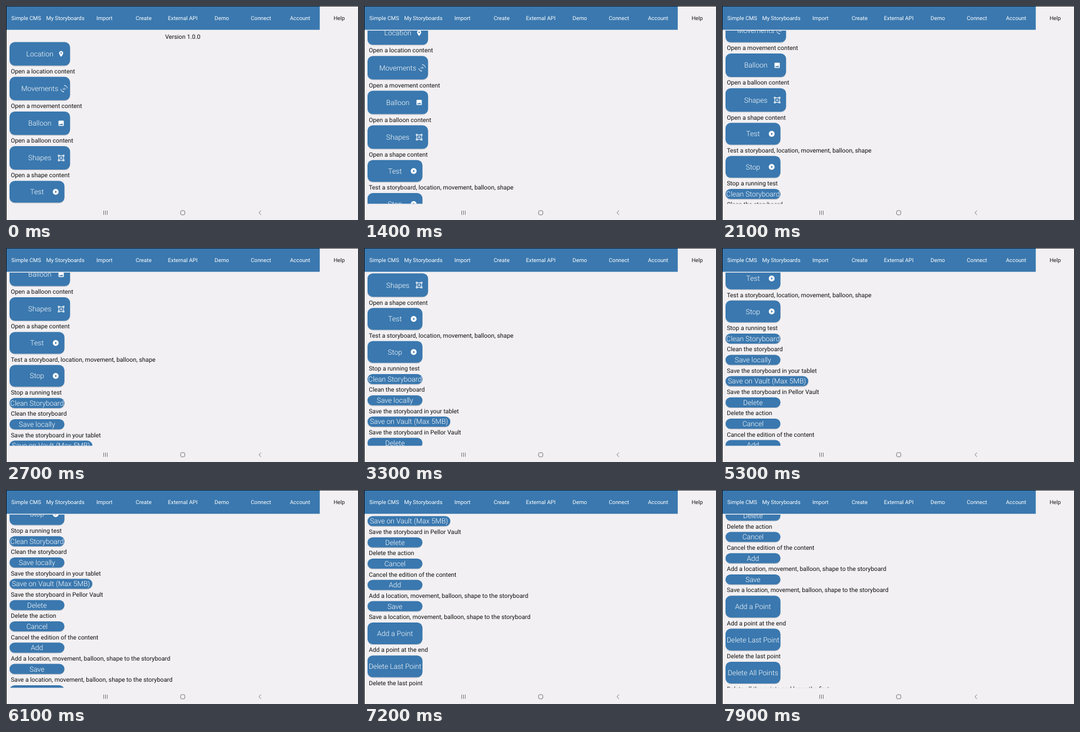
Write an HTML page that moves like this. It is 600 px wide and 365 px high and loops after 8 s.

```html
<!DOCTYPE html>
<html lang="en">
<head>
<meta charset="utf-8">
<title>Help page scroll</title>
<style>
  html, body { margin: 0; width: 100%; height: 100%; overflow: hidden; background: #f2f0f2; }
  svg { display: block; width: 600px; height: 365px; }
  text { font-family: Roboto, "Noto Sans", sans-serif; text-rendering: geometricPrecision; }
  .tab { font-size: 9.35px; fill: #fff; text-anchor: middle; }
  .tab.active { fill: #1c1c1c; }
  .caption { font-size: 10.35px; fill: #111; }
  .label { font-size: 12.15px; font-weight: 300; fill: #fff; text-anchor: middle; }
  .nav { fill: none; stroke: #77757a; stroke-width: 1; }
</style>
</head>
<body>
<svg viewBox="0 0 600 365" xmlns="http://www.w3.org/2000/svg">
  <defs>
    <clipPath id="view"><rect x="1" y="42" width="599" height="295.3"/></clipPath>
  </defs>
  <rect width="600" height="365" fill="#f2f0f2"/>
  <g clip-path="url(#view)"><g id="page"></g></g>
  <g id="header">
    <rect x="1" width="533.8" height="40.6" fill="#3a78af"/>
  </g>
  <path d="M0 0H600V.7H1V365H0Z" fill="#0b0b0d"/>
  <g class="nav">
    <path d="M166.5 349v7.2M169.5 349v7.2M172.5 349v7.2"/>
    <rect x="297.6" y="349" width="7.2" height="7.2" rx="2.2"/>
    <path d="M434.7 349l-3.7 3.6 3.7 3.6"/>
  </g>
</svg>
<script>
const LOOP = 8000, STEP = 100;
const BLUE = '#3a78af';
const NARROW = 93.6, WIDE = 103.2;
const TALL = 39.95, MID = 37.1, SLIM = 17.1, GAP = 19.2;

const tabs = ['Simple CMS', 'My Storyboards', 'Import', 'Create', 'External API',
  'Demo', 'Connect', 'Account', 'Help'];

// Icons live on a 24 unit grid.
const icons = {
  pin: 'M12 2C8.13 2 5 5.13 5 9c0 5.25 7 13 7 13s7-7.75 7-13c0-3.87-3.13-7-7-7zm0 9.5a2.5 2.5 0 1 1 0-5 2.5 2.5 0 0 1 0 5z',
  rotate: 'M7.52 21.48C4.25 19.94 1.91 16.76 1.55 13H.05C.56 19.16 5.71 24 12 24l.66-.03-3.81-3.81zM16.48 2.52c3.27 1.55 5.61 4.72 5.97 8.48h1.5C23.44 4.84 18.29 0 12 0l-.66.03 3.81 3.81z',
  image: 'M21 19V5a2 2 0 0 0-2-2H5a2 2 0 0 0-2 2v14a2 2 0 0 0 2 2h14a2 2 0 0 0 2-2zM8.5 13.5l2.5 3 3.5-4.5 4.5 6H5z',
  shapes: 'M1 1h6v2h10V1h6v6h-2v10h2v6h-6v-2H7v2H1v-6h2V7H1zM3 3v2h2V3zM19 3v2h2V3zM3 19v2h2v-2zM19 19v2h2v-2zM7 5v2H5v10h2v2h10v-2h2V7h-2V5zM11.3 7h1.4l3.4 9h-1.6l-.8-2h-3.4l-.8 2H7.9zM12 8.9l-1.3 3.8h2.6z',
  play: 'M12 2a10 10 0 1 0 0 20 10 10 0 0 0 0-20zM10 7.5l6 4.5-6 4.5z'
};

// label, caption, height, width, icon, icon centre x
const rows = [
  ['Location', 'Open a location content', TALL, WIDE, 'pin', 94],
  ['Movements', 'Open a movement content', TALL, WIDE, 'rotate', 99],
  ['Balloon', 'Open a balloon content', TALL, WIDE, 'image', 94],
  ['Shapes', 'Open a shape content', TALL, WIDE, 'shapes', 94],
  ['Test', 'Test a storyboard, location, movement, balloon, shape', MID, NARROW, 'play', 84.7],
  ['Stop', 'Stop a running test', MID, NARROW, 'play', 84.7],
  ['Clean Storyboard', 'Clean the storyboard', SLIM],
  ['Save locally', 'Save the storyboard in your tablet', SLIM],
  ['Save on Vault (Max 5MB)', 'Save the storyboard in Pellor Vault', SLIM, 141.2],
  ['Delete', 'Delete the action', SLIM],
  ['Cancel', 'Cancel the edition of the content', SLIM],
  ['Add', 'Add a location, movement, balloon, shape to the storyboard', SLIM],
  ['Save', 'Save a location, movement, balloon, shape to the storyboard', SLIM],
  ['Add a Point', 'Add a point at the end', MID],
  ['Delete Last Point', 'Delete the last point', MID],
  ['Delete All Points', 'Delete all the points and leave the first', MID]
];

// time, scroll offset
const keys = [[700, 0], [1400, 35.5], [2700, 155], [3900, 231], [4300, 251],
  [4900, 251], [6100, 332], [7200, 439], [7900, 484.6]];

const page = document.getElementById('page');
const header = document.getElementById('header');

function add(parent, tag, attrs, text) {
  const el = document.createElementNS('http://www.w3.org/2000/svg', tag);
  for (const name in attrs) el.setAttribute(name, attrs[name]);
  if (text) el.textContent = text;
  parent.appendChild(el);
  return el;
}

function addIcon(name, x, y) {
  const g = add(page, 'g', { transform: `translate(${x - 6} ${y - 6}) scale(.5)`, fill: '#fff' });
  add(g, 'path', { d: icons[name], 'fill-rule': 'evenodd' });
  if (name === 'rotate') {
    add(g, 'text', { x: 12, y: 15.2, 'font-size': 9, 'text-anchor': 'middle' }, '3D');
  }
}

function addButton(y, label, h, w, icon, iconX) {
  const rx = Math.min(9, h / 2), mid = y + h / 2;
  add(page, 'rect', { x: 6, y: y + 1.1, width: w, height: h, rx, fill: '#8f9dad', opacity: .6 });
  add(page, 'rect', { x: 6, y, width: w, height: h, rx, fill: BLUE });
  add(page, 'text', { class: 'label', x: 6 + w / 2, y: mid + 4.4 }, label);
  if (icon) addIcon(icon, iconX, mid + .2);
}

function build() {
  tabs.forEach((name, i) => {
    const cls = i === tabs.length - 1 ? 'tab active' : 'tab';
    add(header, 'text', { class: cls, x: 34.4 + i * 66.7, y: 23.9 }, name);
  });
  add(page, 'text', { class: 'caption', x: 301.3, y: 55.8, 'text-anchor': 'middle' }, 'Version 1.0.0');
  let y = 61.6;
  for (const [label, caption, h, w = NARROW, icon, iconX] of rows) {
    addButton(y, label, h, w, icon, iconX);
    add(page, 'text', { class: 'caption', x: 8.2, y: y + h + 13.4 }, caption);
    y += h + GAP;
  }
}

const slope = i => (keys[i + 1][1] - keys[i][1]) / (keys[i + 1][0] - keys[i][0]);

// Harmonic mean keeps the curve from overshooting.
function tangent(i) {
  if (i === 0) return 0;
  if (i === keys.length - 1) return slope(i - 1);
  const a = slope(i - 1), b = slope(i);
  return a * b > 0 ? 2 * a * b / (a + b) : 0;
}

function scrollAt(t) {
  if (t <= keys[0][0]) return 0;
  let i = 0;
  while (i < keys.length - 2 && t > keys[i + 1][0]) i++;
  const [t0, y0] = keys[i], [t1, y1] = keys[i + 1];
  const d = t1 - t0, u = Math.min(1, (t - t0) / d), v = 1 - u;
  return y0 * (1 + 2 * u) * v * v + y1 * u * u * (3 - 2 * u)
    + d * u * v * (tangent(i) * v - tangent(i + 1) * u);
}

function draw(now) {
  const t = Math.floor((now % LOOP) / STEP) * STEP;
  page.setAttribute('transform', `translate(0 ${-scrollAt(t)})`);
}

build();
const start = performance.now();
function tick() {
  draw(performance.now() - start);
  requestAnimationFrame(tick);
}
tick();
</script>
</body>
</html>
```
